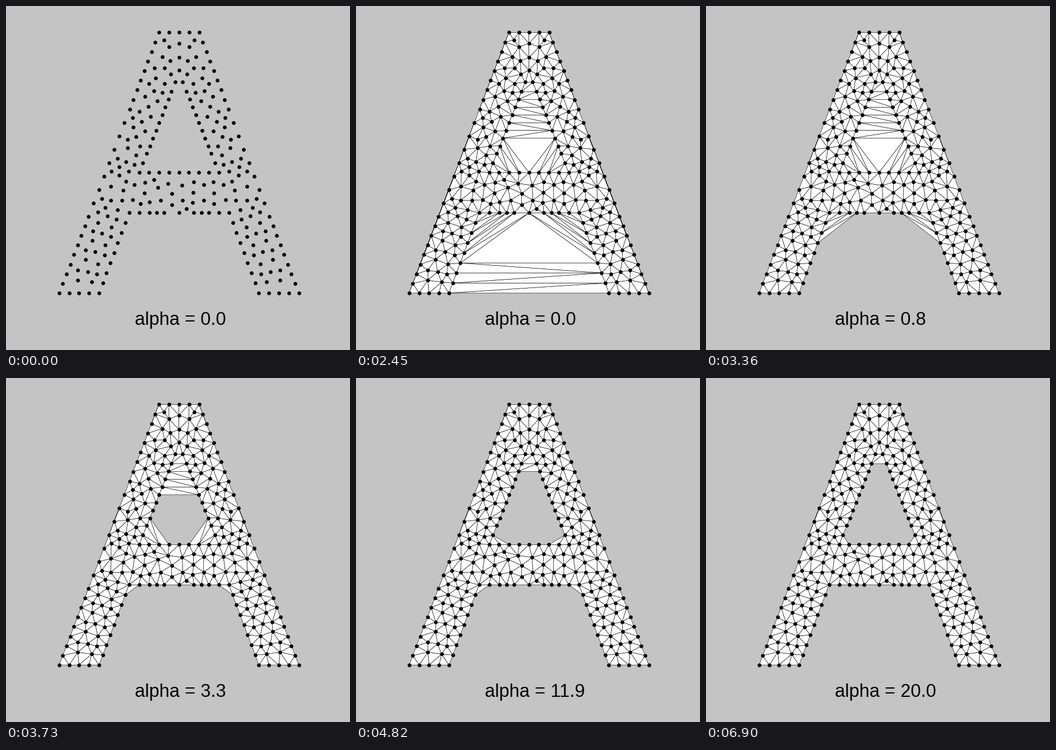
A matplotlib script for the animation above (7.65 s loop, 614 by 616 pixels).

```python
import numpy as np
import matplotlib.pyplot as plt
from matplotlib.animation import FuncAnimation
from matplotlib.collections import PolyCollection
from matplotlib.tri import Triangulation

W, H, DPI = 614, 616, 100
STEP, LOOP = 30, 7650
PX = 72 / DPI
MESH_ON = 2430
REACH = 69.0    # circumradius limit in pixels at alpha = 1
INNER = 150     # points placed inside the letter
PAD = 7         # their least distance from the border

# The letter: a trapezoid with two smaller trapezoids cut out.
MID, TOP, BOTTOM = 308.2, 47, 513.5
APEX, SILL, ARCH = 136, 298, 370


def outer(y):
    return 35.8 + .3816 * (y - TOP)


def counter(y):
    return 6.7 + .397 * (y - APEX)


def legs(y):
    return 89.2 + .373 * (y - ARCH)


def in_letter(x, y, pad=0):
    off = np.abs(x - MID)
    body = (y > TOP + pad) & (y < BOTTOM - pad) & (off < outer(y) - pad)
    hole = (y > APEX - pad) & (y < SILL + pad) & (off < counter(y) + pad)
    gap = (y > ARCH - pad) & (off < legs(y) + pad)
    return body & ~hole & ~gap


def side(half_width, y0, y1, n):
    """Points along a slanted edge at n equal steps of height."""
    y = np.linspace(y0, y1, n + 1)
    return np.column_stack([half_width(y), y])


def level(y, x0, x1, n):
    x = np.linspace(x0, x1, n + 1)
    return np.column_stack([x, np.full(n + 1, y)])


def border():
    """Right half as offsets from the middle, then both halves."""
    knee, hip = 376.3, 184.2
    half = np.vstack([
        level(TOP, 0, outer(TOP), 2),
        side(outer, TOP, hip, 8), side(outer, hip, knee, 8),
        side(outer, knee, BOTTOM, 8),
        level(BOTTOM, legs(BOTTOM), outer(BOTTOM), 4),
        side(legs, ARCH, BOTTOM, 8),
        level(ARCH, 0, 0, 0), level(ARCH, 26.4, 53.2, 2),
        level(ARCH, 53.2, legs(ARCH), 2),
        level(SILL, 0, counter(SILL), 4),
        side(counter, APEX, APEX, 0), side(counter, 153, 264, 8),
        side(counter, 264, SILL, 2),
    ])
    both = np.vstack([half, half * [-1, 1]]).round(3) + 0.0
    return np.unique(both, axis=0) + [MID, 0]


def circles(tri):
    """Circumcentres and circumradii of an array of triangles."""
    a = tri[:, 0]
    u, v = tri[:, 1] - a, tri[:, 2] - a
    cross = 2 * (u[:, 0] * v[:, 1] - u[:, 1] * v[:, 0])
    cross = np.where(np.abs(cross) < 1e-6, 1e-6, cross)
    uu, vv = (u * u).sum(axis=1), (v * v).sum(axis=1)
    d = np.column_stack([v[:, 1] * uu - u[:, 1] * vv,
                         u[:, 0] * vv - v[:, 0] * uu]) / cross[:, None]
    return a + d, np.hypot(*d.T)


def triangles(pts):
    return pts[Triangulation(*pts.T).triangles]


def refine(pts):
    """Keep filling the widest empty circle centred inside the letter."""
    for _ in range(INNER):
        centre, r = circles(triangles(pts))
        r = np.where(in_letter(*centre.T, PAD), r, 0)
        pts = np.vstack([pts, centre[np.argmax(r)]])
    return pts


def ramp(t, start, span):
    """Distance covered when speed grows from 0 to 1 over span."""
    x = max(t - start, 0)
    return x * x / (2 * span) if x < span else x - span / 2


def alpha_at(t):
    travel = ramp(t, 3027, 551) - ramp(t, 5450, 748)
    return 20 * travel / 2521.5


points = refine(border())
mesh = triangles(points)
radius = np.where(in_letter(*mesh.mean(axis=1).T), 0, circles(mesh)[1])

fig = plt.figure(figsize=(W / DPI, H / DPI), dpi=DPI, facecolor="#c4c4c4")
ax = fig.add_axes([0, 0, 1, 1])
ax.set_xlim(-.5, W - .5)
ax.set_ylim(H - .5, -.5)
ax.axis("off")

faces = PolyCollection([], facecolors="white", edgecolors="black",
                       linewidths=.6 * PX, zorder=1)
ax.add_collection(faces)
ax.scatter(*points.T, s=(6.8 * PX) ** 2, c="black", linewidths=0, zorder=2)
label = ax.text(229, 571, "", family="Liberation Sans", size=32.7 * PX,
                color="black", ha="left", va="baseline")


def draw(i):
    t = i * STEP
    alpha = alpha_at(t)
    shown = (radius * np.sqrt(alpha) <= REACH) & (t >= MESH_ON)
    faces.set_verts(mesh[shown])
    label.set_text(f"alpha = {alpha:.1f}")
    return faces, label


anim = FuncAnimation(fig, draw, frames=LOOP // STEP, interval=STEP,
                     repeat=True, repeat_delay=0, blit=False)
plt.show()
```
